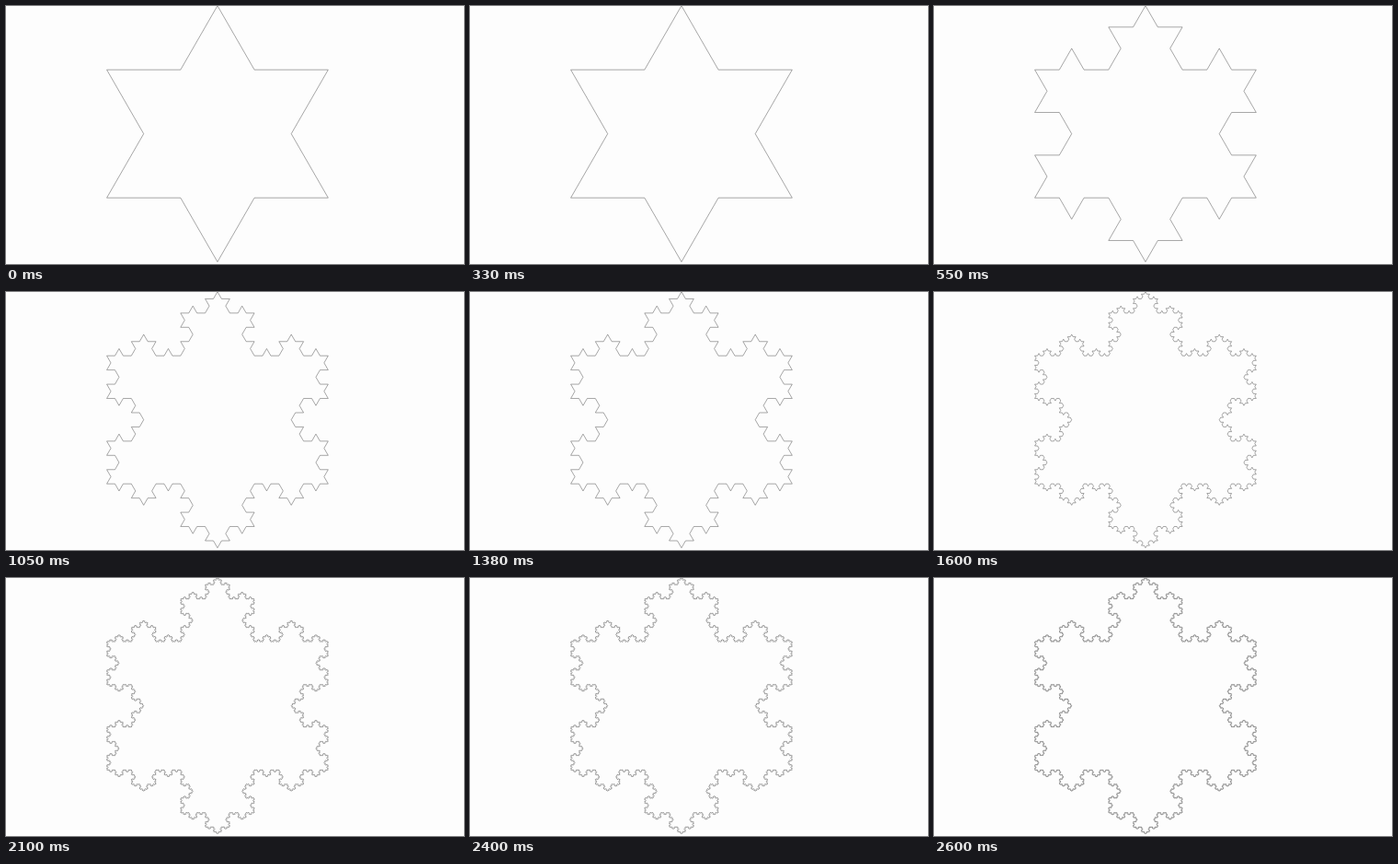
Recreate the animation shown at these times as an HTML page. Size 498 by 280 pixels, loop 2800 ms.

```html
<!DOCTYPE html>
<html lang="en">
<head>
<meta charset="utf-8">
<title>Koch snowflake</title>
<style>
  html, body { margin: 0; width: 100%; height: 100%; overflow: hidden; background: #fdfdfd; }
  svg { display: block; width: 498px; height: 280px; }
  path { fill: none; stroke: #5c5c5c; stroke-width: .54; stroke-linejoin: miter; }
</style>
</head>
<body>
<svg viewBox="0 0 498 280"><path id="flake"/></svg>
<script>
const CENTER = [229.95, 138.7], RADIUS = 139;
const STARTS = [0, 550, 1050, 1600, 2100, 2600];
const LOOP = 2800;
const SIN60 = Math.sqrt(3) / 2;

// Replace each edge with four, the bump pointing outwards.
function subdivide(points) {
  return points.flatMap(([x, y], i) => {
    const [nx, ny] = points[(i + 1) % points.length];
    const dx = (nx - x) / 3, dy = (ny - y) / 3;
    return [
      [x, y],
      [x + dx, y + dy],
      [x + dx * 1.5 + dy * SIN60, y + dy * 1.5 - dx * SIN60],
      [x + dx * 2, y + dy * 2]
    ];
  });
}

const toPath = points =>
  "M" + points.map(p => p.map(v => v.toFixed(3)).join(" ")).join("L") + "Z";

let points = [-90, 30, 150].map(deg => {
  const a = deg * Math.PI / 180;
  return [CENTER[0] + RADIUS * Math.cos(a), CENTER[1] + RADIUS * Math.sin(a)];
});
const paths = STARTS.map(() => toPath(points = subdivide(points)));

const flake = document.getElementById("flake");
const origin = performance.now();
let shown = -1;

function draw() {
  const t = (performance.now() - origin) % LOOP;
  const step = STARTS.filter(s => s <= t).length - 1;
  if (step !== shown) flake.setAttribute("d", paths[shown = step]);
  requestAnimationFrame(draw);
}
draw();
</script>
</body>
</html>
```
